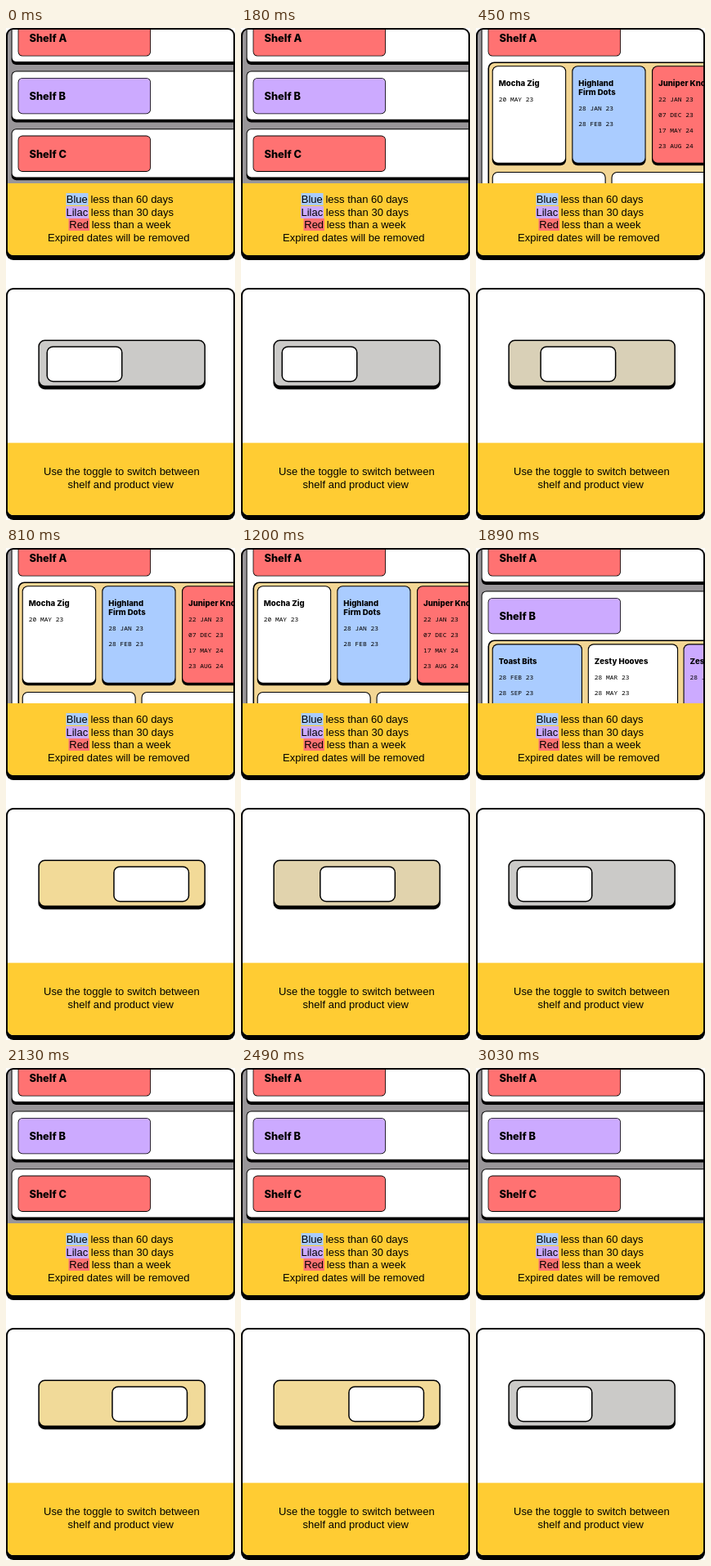
Recreate the animation shown at these times as an HTML page. Size 280 by 602 pixels, loop 3090 ms.

```html
<!DOCTYPE html>
<html lang="en">
<head>
<meta charset="utf-8">
<title>Shelf and product view</title>
<style>
  html, body { margin: 0; width: 100%; height: 100%; overflow: hidden; background: #fff; }
  svg { display: block; width: 100%; height: 100%; }
  text { fill: #000; white-space: pre; }
  .note { font: 13px "Liberation Sans", Arial, sans-serif; text-anchor: middle; }
  .shelf { font: 800 12.8px Inter, sans-serif; }
  .name { font: 800 9.6px Inter, sans-serif; }
  .date { font: 7.9px "Noto Sans Mono", "DejaVu Sans Mono", monospace; }
</style>
</head>
<body>
<svg id="stage" viewBox="0 0 280 602"></svg>
<script>
const LOOP = 3090, TICK = 30, TOGGLE_PERIOD = LOOP / 2;
const RED = '#ff7272', LILAC = '#ccaaff', BLUE = '#aaccff', WHITE = '#fff';
const YELLOW = '#ffcc33', GREY = '#999699', TAN = '#f3d694';
const TRACK_OFF = [203, 202, 200], TRACK_ON = [242, 218, 152];
const THUMB_LEFT = 49.5, THUMB_TRAVEL = 81.7;
const SHELF_TOP = [-18.1, 52.6, 123.3];

const rect = (x, y, w, h, r, fill, extra = '') =>
  `<rect x="${x}" y="${y}" width="${w}" height="${h}" rx="${r}" fill="${fill}" ${extra}/>`;

// A black rounded box with a coloured inside and a thicker bottom edge.
const box = (x, y, w, h, r, fill, edge = 1.5, base = edge, extra = '') =>
  rect(x, y, w, h, r, '#000') +
  rect(x + edge, y + edge, w - 2 * edge, h - edge - base, r - edge, fill, extra);

const text = (cls, x, y, str) => `<text class="${cls}" x="${x}" y="${y}">${str}</text>`;

const header = (label, y, fill) =>
  box(14.6, y, 162.4, 44.3, 5.5, fill, 0.8) + text('shelf', 28.5, y + 26.9, label);

const shelf = (label, y, fill, height = 63) =>
  box(6.6, y, 300, height, 6, WHITE, 1, 3.8) + header(label, y + 8.3, fill);

const product = (x, y, w, h, fill, names, dates) => {
  const datesTop = y + 44 + (names.length - 1) * 11;
  return box(x, y, w, h, 7, fill, 1.1, 3.5) +
    names.map((s, i) => text('name', x + 8, y + 25 + i * 11, s)).join('') +
    dates.map((s, i) => text('date', x + 8, datesTop + i * 18.8, s)).join('');
};

const tray = y => box(14.5, y, 300, 220, 8, TAN, 1.6);

const [topA, topB, topC] = SHELF_TOP;

const closedView =
  shelf('Shelf A', topA, RED) + shelf('Shelf B', topB, LILAC) + shelf('Shelf C', topC, RED);

const openAView =
  shelf('Shelf A', topA, RED, 320) + tray(41.5) +
  product(19.7, 46.2, 90.5, 122, WHITE, ['Mocha Zig'], ['20 MAY 23']) +
  product(117.3, 46.2, 90.3, 122, BLUE, ['Highland', 'Firm Dots'], ['28 JAN 23', '28 FEB 23']) +
  product(215, 46.2, 90.3, 122, RED, ['Juniper Knots'],
    ['22 JAN 23', '07 DEC 23', '17 MAY 24', '23 AUG 24']) +
  product(19.7, 176, 139, 122, WHITE, [], []) +
  product(165.5, 176, 139, 122, WHITE, [], []);

const openBView =
  shelf('Shelf A', topA, RED) + shelf('Shelf B', topB, LILAC, 320) + tray(112.5) +
  product(19.7, 117.3, 110.3, 122, BLUE, ['Toast Bits'], ['28 FEB 23', '28 SEP 23']) +
  product(136.8, 117.3, 110.3, 122, WHITE, ['Zesty Hooves'], ['28 MAR 23', '28 MAY 23']) +
  product(253.5, 117.3, 110.3, 122, LILAC, ['Zesty Loops'], ['28 JAN 23']);

const stage = document.getElementById('stage');
stage.innerHTML =
  `<clipPath id="upper">${rect(2, 2, 276, 276, 7, '#000')}</clipPath>` +
  `<clipPath id="lower">${rect(2, 320, 276, 276, 7, '#000')}</clipPath>` +
  box(0, 0, 280, 284, 9, GREY, 2, 6) +
  `<g clip-path="url(#upper)">
    <g class="view">${closedView}</g><g class="view">${openAView}</g><g class="view">${openBView}</g>
    ${rect(2, 190, 276, 90, 0, YELLOW)}
    ${rect(73.5, 202, 27, 15, 0, BLUE)}${rect(73, 218, 28, 15, 0, LILAC)}${rect(76.5, 233, 25.5, 15, 0, RED)}
    ${text('note', 139.2, 214, 'Blue less than 60 days')}
    ${text('note', 139.2, 230, 'Lilac less than 30 days')}
    ${text('note', 139.4, 245, 'Red less than a week')}
    ${text('note', 137.8, 261, 'Expired dates will be removed')}
  </g>` +
  box(0, 318, 280, 284, 9, WHITE, 2, 6) +
  `<g clip-path="url(#lower)">${rect(2, 507.6, 276, 90, 0, YELLOW)}</g>` +
  text('note', 141.4, 547, 'Use the toggle to switch between') +
  text('note', 140.3, 563, 'shelf and product view') +
  box(39.4, 381.6, 204.5, 60.6, 8, '#ccc', 1.5, 4.8, 'id="track"') +
  `<g id="thumb">${box(0, 389.2, 93, 44, 8, WHITE, 1.5)}</g>`;

const views = [...stage.querySelectorAll('.view')];
const track = document.getElementById('track');
const thumb = document.getElementById('thumb');

// The standard CSS "ease" curve, solved by bisection.
function ease(t) {
  if (t <= 0) return 0;
  if (t >= 1) return 1;
  const bezier = (u, a, b) => 3 * u * (1 - u) ** 2 * a + 3 * u * u * (1 - u) * b + u ** 3;
  let lo = 0, hi = 1;
  for (let i = 0; i < 24; i++) {
    const mid = (lo + hi) / 2;
    if (bezier(mid, 0.25, 0.25) < t) lo = mid; else hi = mid;
  }
  return bezier(lo, 0.1, 1);
}

// Steps of 54 ms, each rounded up to the next tick.
function stepTime(ms) {
  const step = Math.floor(Math.floor(ms / TICK) * 5 / 9);
  return Math.ceil(step * 9 / 5) * TICK;
}

function viewAt(t) {
  if (t < 330) return 0;
  if (t < 1290) return 1;
  return t < 1980 ? 2 : 0;
}

function draw(ms) {
  const t = stepTime(ms % LOOP);
  const phase = t % TOGGLE_PERIOD;
  const on = ease((phase - 397) / 235) - ease((phase - 1100) / 385);
  const color = TRACK_OFF.map((c, i) => Math.round(c + (TRACK_ON[i] - c) * on));
  track.setAttribute('fill', `rgb(${color})`);
  thumb.setAttribute('transform', `translate(${THUMB_LEFT + THUMB_TRAVEL * on} 0)`);
  const current = viewAt(t);
  views.forEach((v, i) => v.setAttribute('display', i === current ? 'inline' : 'none'));
}

const start = performance.now();
function loop() {
  draw(performance.now() - start);
  requestAnimationFrame(loop);
}
loop();
</script>
</body>
</html>
```
